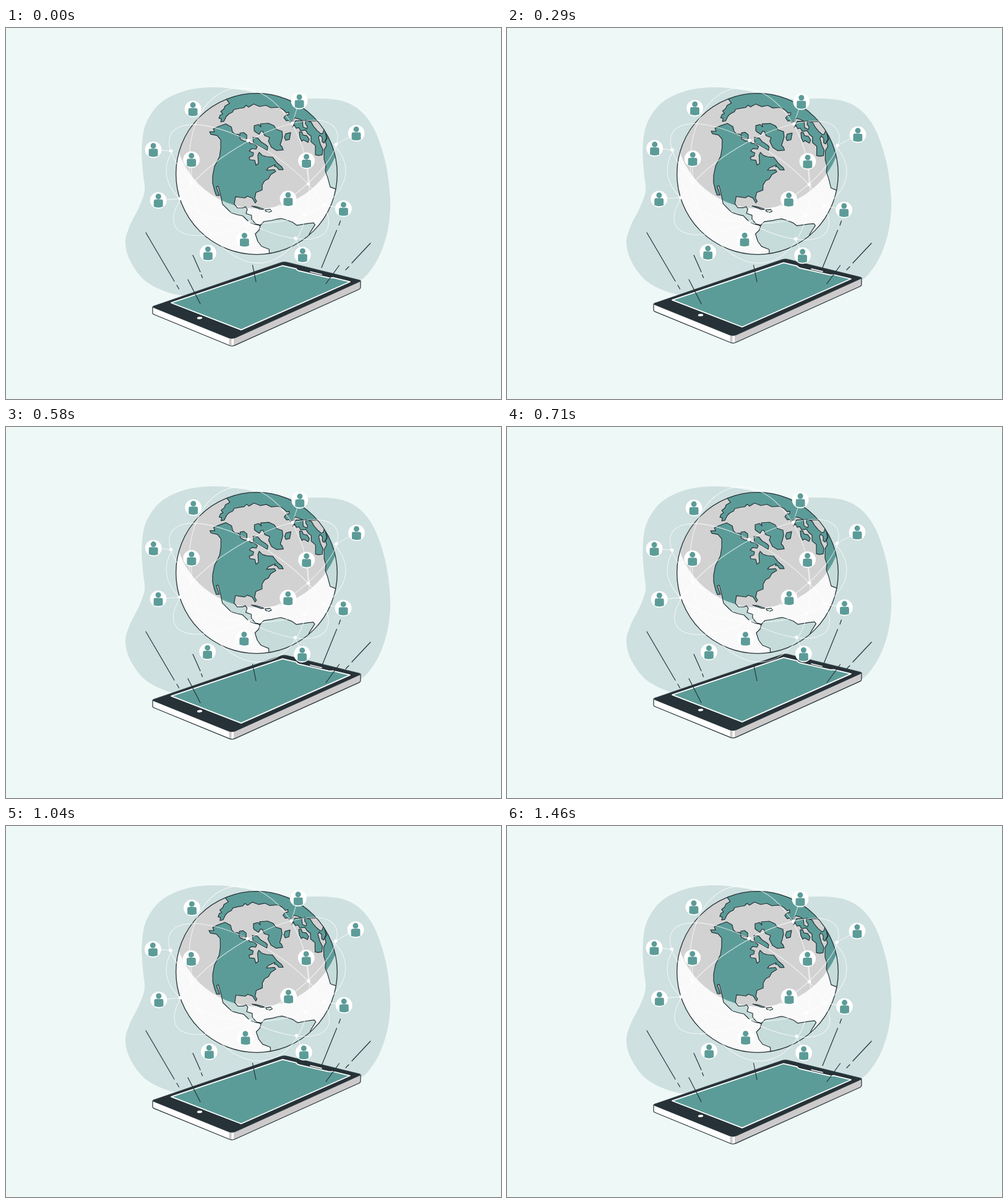
An HTML page with a canvas that plays this animation: 800x600 px, repeating every 1500 ms.

```html
<!DOCTYPE html>
<html lang="en">
<head>
<meta charset="utf-8">
<title>Connected globe</title>
<style>
html, body { margin: 0; width: 100%; height: 100%; overflow: hidden; background: #eef8f7; }
canvas { display: block; width: 800px; height: 600px; }
</style>
</head>
<body>
<canvas id="stage" width="800" height="600"></canvas>
<script>
const ctx = document.getElementById('stage').getContext('2d');
const LOOP = 1500, STEPS = 36;
const DARK = '#263238', TEAL = '#5c9c98', WHITE = '#fff';
const GLOBE = { x: 405, y: 236, r: 130.3 };
const NET = { x: 402.5, y: 238 };

const path = d => new Path2D(d);
const circlePath = (x, y, r) => {
  const p = new Path2D();
  p.arc(x, y, r, 0, Math.PI * 2);
  return p;
};

// Closed smooth curve through the given points
function smoothPath(points) {
  const p = new Path2D(), n = points.length;
  const at = i => points[(i + n) % n];
  p.moveTo(...points[0]);
  for (let i = 0; i < n; i++) {
    const [a, b, c, d] = [at(i - 1), at(i), at(i + 1), at(i + 2)];
    p.bezierCurveTo(b[0] + (c[0] - a[0]) / 6, b[1] + (c[1] - a[1]) / 6,
      c[0] - (d[0] - b[0]) / 6, c[1] - (d[1] - b[1]) / 6, c[0], c[1]);
  }
  return p;
}

function paint(shape, fill, stroke, width = 1.2) {
  if (fill) { ctx.fillStyle = fill; ctx.fill(shape); }
  if (stroke) { ctx.strokeStyle = stroke; ctx.lineWidth = width; ctx.stroke(shape); }
}

function scoped(draw) {
  ctx.save();
  draw();
  ctx.restore();
}

function rotateAbout({ x, y }, angle) {
  ctx.translate(x, y);
  ctx.rotate(angle);
  ctx.translate(-x, -y);
}

const blob = smoothPath([
  [336, 96], [385, 101], [440, 114], [520, 114.5], [562, 126], [592, 158], [612, 212],
  [620.5, 270], [619, 315], [609, 355], [592, 388], [566, 412], [500, 436], [400, 440],
  [300, 434], [260, 427], [224, 408], [201, 377], [193, 347], [200, 320], [215, 290],
  [224, 263], [221.5, 235], [219.5, 195], [226, 155], [250, 121], [290, 101.5]
]);

const land = [
  // North and Central America
  'M329 168L337 168L335 163L344 159L355 155L364 160L366 168L370 172L376 172L379 180L385 183L392 183L395 187L401 187L406 192' +
  'L404 196L397 195L393 199L400 202L399 207L393 209L394 213L402 214L404 222L408 219L407 206L409 201L414 206L421 208L431 209' +
  'L438 218L446 225L448 229L441 229L437 224L434 224L435 221L424 226L421 230L434 229L436 232L428 237L424 244L418 247L414 254' +
  'L414 262L404 266L402 275L405 280L403 283L398 275L390 272L386 275L379 274L371 273L369 285L374 291L383 291L387 289' +
  'L390 293L388 300L397 303L397 309L401 314L404 317L412 319L404 318L394 315L388 309L383 304L374 302L364 299L356 291L350 285' +
  'L347 271L343 256L340 257L345 271L340 271L337 263L334 251L334 239L337 224L345 208L347 195L347 181L341 174L331 172Z',
  // South America
  'M404 317L411 319L417 313L430 311L438 309L445 308L455 311L463 314L470 319L488 316L497 315L499.500 318L492 330L490 334' +
  'L495 350L465 385L426 385L425.500 358L413 353L407 345L403 333L409 327L411 320Z',
  // Caribbean
  'M397 288L405 289L417 293L412 293.500L404 290.500Z',
  'M419 294L427 293L429.500 296L425 298L420 296.500Z',
  // Arctic islands
  'M401 158L408 156L412 160L411 155L424 154L433 158L437 164L446 167L447 175L445 183L443 189L446 192L448 197L437 198L429 193' +
  'L424 183L426 177L418 174L415 167L412 167L409 172L403 168L401 166Z',
  'M399 177L407 178L412 184L420 189L423 192L422 198L413 193L408 190L400 186Z',
  'M378 170L384 169L389 173L389 180L382 178L378 176Z',
  'M452 171L460 169L458 180L452 181.500L450 177Z',
  // Northern Eurasia down to Iberia
  'M355 114L361 122L354 126L352 131L347 135L350 139L346 141L344 146L348 147L347 152L352 151L356 143L360 139L366 136L368 132' +
  'L377 130L384 129L388 125L392 128L400 123L410 127L420 125L428 129L440 128L448 132L453 137L457 136L457 140L452 141L449 145' +
  'L453 150L457 149L460 153L464 150L466 145L473 147L479 150L480 160L486 163L487 159L484 155L484 149L493 152L497 159L503 166' +
  'L509 171L512 170L514 164L509 157L506 151L515 163L518 178L514 186L511 184L511 177L507 173L505 177L508 188L512 196L511 205' +
  'L505 206L500 205L500 190L493 184L493 175L488 171L484 165L476 166L473 161L469 162L466 157L463 160L468 150L540 150L480 60L380 80Z',
  'M474 168L478 168L480 173L486 174L490 180L488 185L481 181L478 183L475 177Z',
  // Right edge and Africa
  'M506 151L514 162L519 178L516 183L518 190L514 197L514 212L517 222L516 231L520 242L524 257L532 260L550 262L550 150Z'
].map(path);

const globeDisc = circlePath(GLOBE.x, GLOBE.y, GLOBE.r);
const shade = circlePath(407, 157, 135);

// x, y, radiusX, radiusY, tilt, start, end
const orbits = [
  [392.5, 249, 148, 58, 0.56, 0, 6.284],
  [403.5, 242.5, 151.7, 57.5, -0.551, 0, 6.284],
  [393, 238.5, 143, 95, 1.38, 0, 6.284],
  [404, 231, 145, 85, 0, -0.53, 3.53]
];

// Person x, y and, where connected, the node x, y
const people = [
  [302, 131], [326.5, 364],
  [474, 118, 462.5, 154], [566, 170, 533.5, 188], [238, 197, 266.2, 199],
  [246.3, 279, 281, 276], [299.7, 213, 300, 250], [485.6, 214.5, 488.7, 252],
  [456, 276.3, 483, 302], [545.5, 292, 513.5, 286], [385.5, 342, 392, 315],
  [479.5, 367, 468, 340]
];
const crossing = [391, 182];

const body = path('M-5 -1.500H5Q7.400 -1.500 7.400 1V10Q0 13.200 -7.400 10V1Q-7.400 -1.500 -5 -1.500Z');

const rays = path('M226 331L272 409.500M276 416L279.500 422M302 367.500L314 394.500M315.500 399L317.500 404M294 407' +
  'L314 446M398.500 383.500L404 410.500M540.500 312L538 319M534.500 327L510 387.500M589 348L559 380M554 386L549 391M538.500 384L517 413.500');

const phone = {
  shell: path('M237 451V461Q237 462.500 239 463.300L360 513Q365 515.500 370 513.200L571 422.500Q573 421.500 573 419V409Z'),
  side: path('M365 501L573 409V419Q573 421.500 571 422.500L370 513.200Q368 514.500 365 514.500Z'),
  bevel: path('M360.500 500H373V512.500Q366 515.500 360.500 513Z'),
  shine: path('M364.500 501H368V514H364.500Z'),
  top: path('M239 449.500L445 379Q450 377.500 455 379L571 407.500Q575 408.800 571 410.500L371 501Q365 503.500 359 501L239 452.500Q235.500 451 239 449.500Z'),
  outline: path('M237 451V461Q237 462.500 239 463.300L360 513Q365 515.500 370 513.200L571 422.500Q573 421.500 573 419V409'),
  screen: path('M267 444.500L447 384.300L469 389.500Q470 392 474 393L521 403.800Q525 404.500 528 403.700L556 410.500L380 488.200Z'),
  speaker: path('M492 394.300L510 398.600')
};

function drawPhone(dy) {
  scoped(() => {
    ctx.translate(0, dy);
    paint(phone.shell, WHITE);
    paint(phone.side, '#cccaca');
    paint(phone.bevel, '#cccaca');
    paint(phone.shine, WHITE);
    paint(phone.outline, null, DARK);
    paint(phone.top, DARK, DARK, 0.6);
    paint(phone.screen, TEAL, WHITE, 1.8);
    paint(phone.speaker, null, WHITE, 1.6);
    ctx.beginPath();
    ctx.ellipse(313, 469, 4.2, 2, -0.1, 0, 7);
    ctx.fillStyle = WHITE;
    ctx.fill();
  });
}

function drawGlobe(angle) {
  const fillLand = color => scoped(() => {
    rotateAbout(GLOBE, angle);
    land.forEach(piece => paint(piece, color));
  });
  scoped(() => {
    ctx.clip(globeDisc);
    paint(globeDisc, '#f9f9f9');
    fillLand('#c6dcda');
    scoped(() => {
      ctx.clip(shade);
      paint(globeDisc, '#d2d2d2');
      fillLand(TEAL);
    });
    rotateAbout(GLOBE, angle);
    land.forEach(piece => paint(piece, null, DARK));
  });
  paint(globeDisc, null, DARK, 1.3);
}

function drawNetwork(angle) {
  scoped(() => {
    rotateAbout(NET, angle);
    ctx.strokeStyle = 'rgba(255,255,255,0.7)';
    ctx.lineWidth = 1.1;
    for (const orbit of orbits) {
      ctx.beginPath();
      ctx.ellipse(...orbit);
      ctx.stroke();
    }
    const nodes = people.filter(p => p.length > 2);
    for (const [x, y, nx, ny] of nodes) {
      ctx.beginPath();
      ctx.moveTo(x, y);
      ctx.lineTo(nx, ny);
      ctx.stroke();
    }
    for (const [x, y] of [crossing, ...nodes.map(p => p.slice(2))]) paint(circlePath(x, y, 2.7), WHITE);
    for (const [x, y] of people) scoped(() => {
      ctx.translate(x, y);
      paint(circlePath(0, 0, 13.4), WHITE);
      paint(circlePath(0, -6.3, 4.5), TEAL);
      paint(body, TEAL);
    });
  });
}

function render(time) {
  // Motion advances at 24 steps per second
  const step = Math.floor(((time % LOOP) + 5) / LOOP * STEPS) % STEPS;
  const phase = (step + 0.5) / STEPS;
  const sway = Math.asin(Math.sin(phase * 2 * Math.PI)) / 90;
  const lift = -12 * (1 - Math.abs(2 * phase - 1));

  ctx.fillStyle = '#eef8f7';
  ctx.fillRect(0, 0, 800, 600);
  paint(blob, '#cee0df');
  drawGlobe(sway);
  drawPhone(lift + 0.3);
  paint(rays, null, DARK);
  drawNetwork(sway);
}

const start = performance.now();
function tick() {
  render(performance.now() - start);
  requestAnimationFrame(tick);
}
ctx.lineJoin = 'round';
ctx.lineCap = 'round';
tick();
</script>
</body>
</html>
```
